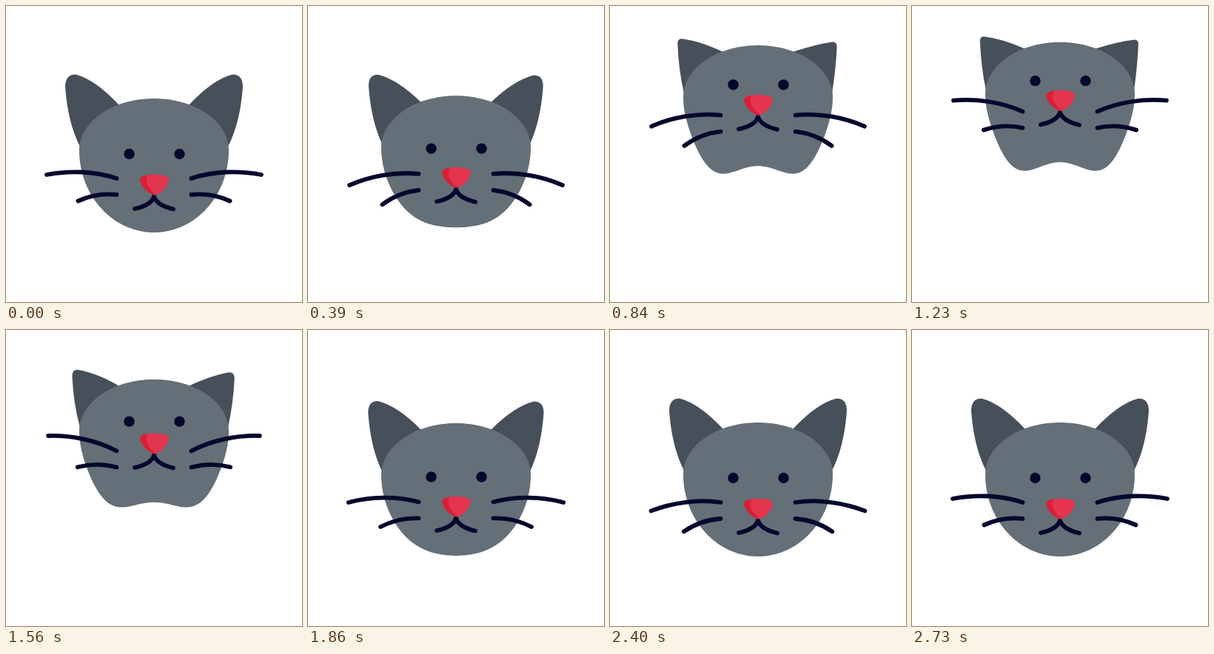
These frames come from a looping animation (400x400 px, 7090 ms). An HTML page:

```html
<!DOCTYPE html>
<html lang="en">
<head>
<meta charset="utf-8">
<title>Jumping cat</title>
<style>
  html, body { margin: 0; width: 100%; height: 100%; overflow: hidden; background: #fff; }
  svg { display: block; width: 100vw; height: 100vh; }
  .line { fill: none; stroke: #05082d; stroke-width: 5.8; stroke-linecap: round; stroke-linejoin: round; }
</style>
</head>
<body>
<svg viewBox="0 0 400 400">
  <defs>
    <g id="whiskers" class="line">
      <path class="whisker" data-pivot="149.5 233" d="M149.5 233C120 223 85 222 55 228"/>
      <path class="whisker" data-pivot="149.5 255" d="M149.5 255C131 253 113 256.5 97.5 263.5"/>
    </g>
  </defs>
  <g id="head">
    <g fill="#474f5a">
      <path id="leftEar"/>
      <path id="rightEar" transform="translate(400 0) scale(-1 1)"/>
    </g>
    <polygon id="face" fill="#656f78"/>
    <g id="whiskerPair">
      <use href="#whiskers"/>
      <use href="#whiskers" transform="translate(400 0) scale(-1 1)"/>
    </g>
    <g id="eyes" fill="#05082d">
      <circle cx="166.5" cy="200" r="7.2"/>
      <circle cx="234.5" cy="200" r="7.2"/>
    </g>
    <g id="muzzle">
      <path class="line" d="M174 274Q197 269 200 257Q203 269 226 274.5"/>
      <path fill="#d91f38" d="M200.5 256Q184 249 181 235Q181 228 200 228Q220 228 220 235Q216 249 200.5 256Z"/>
      <path fill="#e4354f" d="M203 255Q185 242 191.5 228.5L200 228Q220 228 220 235Q217 249 203 255Z"/>
    </g>
  </g>
</svg>
<script>
const LOOP = 7090, MOTION_END = 2730, STEP = 30;
const DIP = 10, JUMP = 87;

const $ = id => document.getElementById(id);
const mix = (a, b, k) => a + (b - a) * k;

// Ease with horizontal handles at x1 and x2
function ease(x, x1 = 1 / 3, x2 = 2 / 3) {
  let lo = 0, hi = 1;
  for (let i = 0; i < 24; i++) {
    const s = (lo + hi) / 2, r = 1 - s;
    if (3 * r * r * s * x1 + 3 * r * s * s * x2 + s ** 3 < x) lo = s; else hi = s;
  }
  return lo * lo * (3 - 2 * lo);
}

// Keys: [time, value, x1, x2], with the handles of the segment that follows
function track(keys, t) {
  if (t >= keys.at(-1)[0]) return keys.at(-1)[1];
  const i = keys.findIndex(key => key[0] > t) - 1;
  const [t0, v0, x1, x2] = keys[i], [t1, v1] = keys[i + 1];
  return mix(v0, v1, ease((t - t0) / (t1 - t0), x1, x2));
}

const CROUCH = [[0, 0], [200, DIP], [2026, DIP], [2240, 0]];
const STRETCH = [[0, 0], [195, 0, 0.4, 0.2], [1108, 1, 0.8, 0.6], [2026, 0]];
const DROOP = [[0, 0], [570, 16, 0.5, 0.5], [1500, -10], [2190, 15], [2730, 0]];

// Two curved sides that meet at a tip; stretching sharpens and lowers the tip
function earPath(stretch, lean = 0) {
  const x = 80 + (12 + lean / 2) * stretch;
  const y = 92.5 + (25 + lean) * stretch;
  const round = 14 - 9 * stretch;
  return `M153 134Q121 ${y + round / 2} ${x + round} ${y}` +
    `Q${x} ${y} ${x} ${y + 1.2 * round}Q${x + round / 4} 158 100 190Z`;
}

// An egg whose chin dents in the middle and bulges on both sides when stretched
function facePoints(stretch) {
  const points = [];
  for (let degrees = 0; degrees < 360; degrees += 2) {
    const angle = degrees * Math.PI / 180, down = Math.cos(angle);
    const dent = 19 * stretch * Math.cos(4 * angle) * Math.max(down, 0) ** 1.5;
    points.push([200 + 101 * Math.sin(angle), 195 + (down > 0 ? 111 : 70) * down - dent]);
  }
  return points.join(' ');
}

function draw(time) {
  const t = Math.min(Math.floor(time % LOOP / STEP) * STEP, MOTION_END);
  const stretch = track(STRETCH, t);
  const droop = track(DROOP, t);
  const shift = (id, y) => $(id).setAttribute('transform', `translate(0 ${y})`);

  shift('head', track(CROUCH, t) - JUMP * stretch);
  shift('eyes', -23 * stretch);
  shift('muzzle', -38 * stretch);
  shift('whiskerPair', -14.3 * stretch);
  for (const whisker of document.querySelectorAll('.whisker'))
    whisker.setAttribute('transform', `rotate(${-droop} ${whisker.dataset.pivot})`);

  $('leftEar').setAttribute('d', earPath(stretch));
  $('rightEar').setAttribute('d', earPath(stretch, 4.5));
  $('face').setAttribute('points', facePoints(stretch));
}

const start = performance.now();
function tick() {
  draw(performance.now() - start);
  requestAnimationFrame(tick);
}
tick();
</script>
</body>
</html>
```
